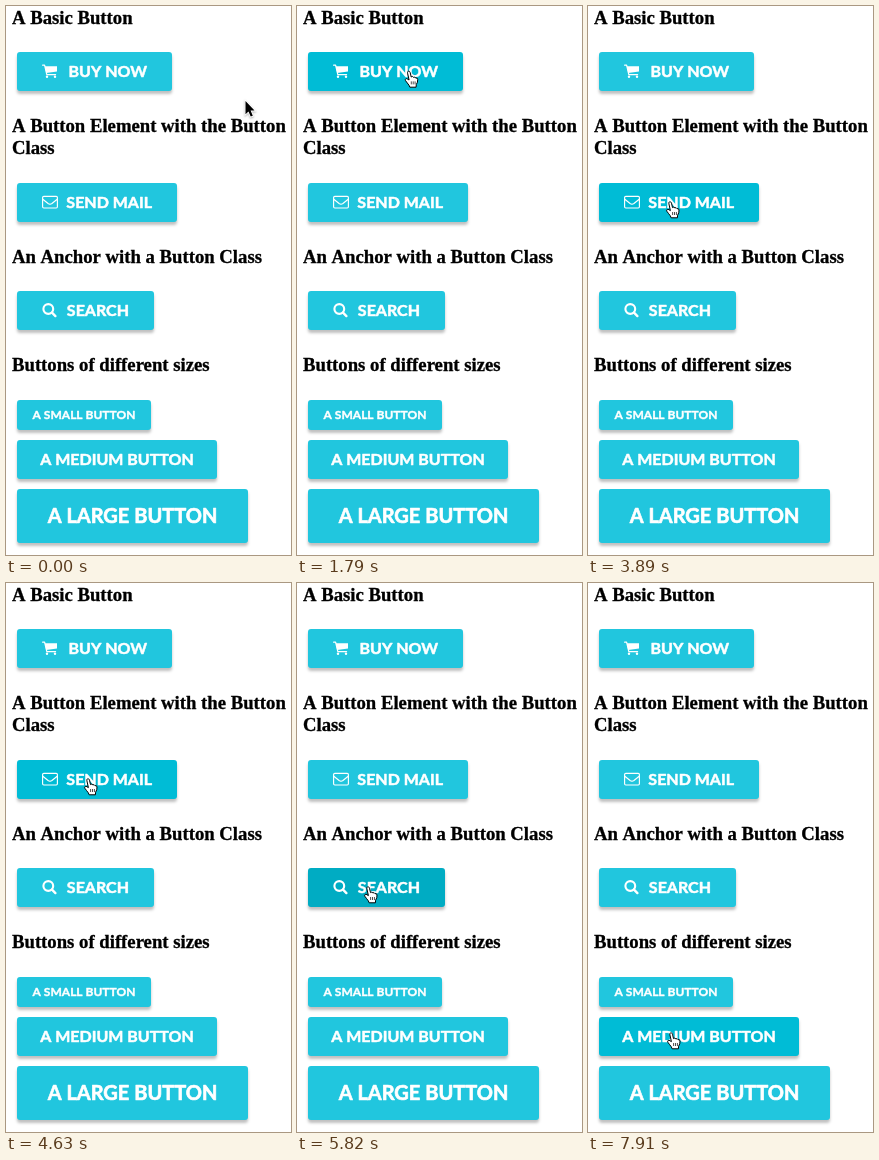
An HTML page with a canvas that plays this animation: 285 px wide and 549 px high, repeating every 8 s.

```html
<!DOCTYPE html>
<html lang="en">
<head>
<meta charset="utf-8">
<title>Button styles</title>
<style>
html, body { margin: 0; width: 285px; height: 549px; overflow: hidden; background: #fff; }
canvas { display: block; }
</style>
</head>
<body>
<canvas id="stage" width="285" height="549"></canvas>
<script>
const ctx = document.getElementById('stage').getContext('2d');
const LOOP = 8000;
const STEP = 145; // the pointer is redrawn at this interval while it travels
const COLORS = { idle: '#21c6de', hover: '#00bcd6', press: '#00acc3' };

const SIZES = {
  small: { h: 30, font: 12, pad: 15 },
  medium: { h: 39, font: 16, pad: 25 },
  large: { h: 54, font: 20, pad: 30 }
};

const headings = [
  { text: 'A Basic Button', y: 18 },
  { text: 'A Button Element with the Button', y: 126 },
  { text: 'Class', y: 148 },
  { text: 'An Anchor with a Button Class', y: 257 },
  { text: 'Buttons of different sizes', y: 365 }
];

function button(label, y, w, size, icon) {
  return { label, x: 11, y, w, icon, ...SIZES[size] };
}

const buy = button('BUY NOW', 46, 155, 'medium', cart);
const mail = button('SEND MAIL', 177, 160, 'medium', envelope);
const search = button('SEARCH', 285, 137, 'medium', magnifier);
const small = button('A SMALL BUTTON', 394, 134, 'small');
const medium = button('A MEDIUM BUTTON', 434, 200, 'medium');
const large = button('A LARGE BUTTON', 483, 231, 'large');
const buttons = [buy, mail, search, small, medium, large];

// Each visit: when travel starts, its steps, where it ends, and the click there.
const home = { x: 240, y: 95 };
const visits = [
  { start: 1200, steps: 6, x: 84, y: 59, press: 2690, release: 3440, lag: 3 },
  { start: 3440, steps: 4, x: 82, y: 196, press: 4340, release: 4630 },
  { start: 4930, steps: 4, x: 71, y: 304, press: 5820, release: 5970 },
  { start: 6420, steps: 3, x: 79, y: 408, press: 7320, release: 7620 },
  { start: 7620, steps: 3, x: 83, y: 450 }
];

function pointerAt(t) {
  const i = visits.findLastIndex(v => v.start <= t);
  if (i < 0) return home;
  const from = visits[i - 1] || home;
  const to = visits[i];
  const step = Math.floor((t - to.start) / STEP) + 1;
  const p = Math.min(1, step / to.steps);
  const eased = 1 - (1 - p ** (to.lag || 1)) ** 2;
  return {
    x: from.x + (to.x - from.x) * eased,
    y: from.y + (to.y - from.y) * eased,
    pressed: t >= to.press && t < to.release
  };
}

function shape(...points) {
  ctx.beginPath();
  points.forEach(([x, y]) => ctx.lineTo(x, y));
}

function line(width, ...points) {
  shape(...points);
  ctx.lineWidth = width;
  ctx.stroke();
}

function disc(x, y, r) {
  ctx.beginPath();
  ctx.arc(x, y, r, 0, Math.PI * 2);
}

// A hairline outline gives the text its heavier weight.
function heavyText(text, x, y, weight) {
  ctx.lineWidth = weight;
  ctx.fillText(text, x, y);
  ctx.strokeText(text, x, y);
}

function cart() {
  line(1.2, [0.6, -5.8], [2.6, -5.8], [4.8, 3.6], [13.6, 3.6]);
  shape([2.8, -4.8], [15, -4.8], [15, 0.6], [4.2, 2]);
  ctx.fill();
  for (const x of [5, 13]) {
    disc(x, 5.7, 1.2);
    ctx.fill();
  }
}

function envelope() {
  ctx.beginPath();
  ctx.roundRect(0.6, -5.6, 14.8, 11.6, 1.2);
  ctx.lineWidth = 1.15;
  ctx.stroke();
  line(1.15, [0.8, -2.8], [6.4, 1.7], [8, 2.3], [9.6, 1.7], [15.2, -2.8]);
}

function magnifier() {
  disc(6.3, -1, 4.9);
  ctx.lineWidth = 2.1;
  ctx.stroke();
  line(2.4, [10, 2.7], [13.4, 6.1]);
}

function drawButton(b, color) {
  ctx.save();
  ctx.shadowColor = 'rgba(0,0,0,0.25)';
  ctx.shadowOffsetY = 3;
  ctx.shadowBlur = 3;
  ctx.fillStyle = color;
  ctx.beginPath();
  ctx.roundRect(b.x, b.y, b.w, b.h, 3);
  ctx.fill();
  ctx.restore();

  ctx.save();
  const middle = b.y + b.h / 2;
  const right = b.x + b.w - b.pad;
  ctx.fillStyle = ctx.strokeStyle = '#fff';
  ctx.lineCap = ctx.lineJoin = 'round';
  ctx.font = `bold ${b.font}px Lato, sans-serif`;
  ctx.textAlign = b.icon ? 'right' : 'center';
  heavyText(b.label, b.icon ? right : b.x + b.w / 2,
    Math.round(middle + b.font * 0.36), b.font * 0.035);
  if (b.icon) {
    ctx.translate(b.x + b.pad, middle - 0.5);
    b.icon();
  }
  ctx.restore();
}

function drawArrow(x, y) {
  ctx.save();
  ctx.translate(x - 0.5, y);
  ctx.shadowColor = 'rgba(0,0,0,0.3)';
  ctx.shadowOffsetY = 1;
  ctx.shadowBlur = 2;
  shape([0, 0], [0, 13.2], [3, 10.4], [5.2, 15.6], [7.3, 14.7], [5.1, 9.6], [9, 9.6]);
  ctx.closePath();
  ctx.strokeStyle = '#fff';
  ctx.lineWidth = 1.8;
  ctx.stroke();
  ctx.shadowColor = 'transparent';
  ctx.fillStyle = '#000';
  ctx.fill();
  ctx.restore();
}

function drawHand(x, y) {
  ctx.save();
  ctx.translate(x - 4, y - 1);
  ctx.beginPath();
  ctx.moveTo(4.4, 9.6);
  ctx.lineTo(2.9, 2.8);
  ctx.bezierCurveTo(2.4, 0.4, 4.9, 0, 5.5, 2.2);
  ctx.lineTo(6.5, 6.6);
  ctx.quadraticCurveTo(8, 5.2, 8.8, 7);
  ctx.quadraticCurveTo(10.2, 5.9, 11, 7.7);
  ctx.quadraticCurveTo(12.8, 7, 13, 9);
  ctx.quadraticCurveTo(13.2, 12, 11.6, 14.2);
  ctx.lineTo(11.4, 16.8);
  ctx.lineTo(5.2, 16.8);
  ctx.quadraticCurveTo(4.6, 14.8, 2.6, 12.6);
  ctx.lineTo(0.8, 10.2);
  ctx.bezierCurveTo(0, 8.6, 1.8, 7.6, 3, 8.8);
  ctx.closePath();
  ctx.fillStyle = '#fff';
  ctx.strokeStyle = '#000';
  ctx.lineJoin = 'round';
  ctx.lineWidth = 1;
  ctx.fill();
  ctx.stroke();
  for (const px of [6.6, 8.5, 10.4]) line(0.7, [px, 11], [px, 14]);
  ctx.restore();
}

function render(t) {
  const { x, y, pressed } = pointerAt(t);
  const target = buttons.find(b =>
    x >= b.x && x < b.x + b.w && y >= b.y && y < b.y + b.h);

  ctx.fillStyle = '#fff';
  ctx.fillRect(0, 0, 285, 549);
  ctx.fillStyle = ctx.strokeStyle = '#000';
  ctx.font = 'bold 18.72px "Liberation Serif", Times, serif';
  headings.forEach(h => heavyText(h.text, 6, h.y, 0.3));

  buttons.forEach(b => {
    const state = b !== target ? 'idle' : pressed ? 'press' : 'hover';
    drawButton(b, COLORS[state]);
  });
  (target ? drawHand : drawArrow)(x, y);
}

const start = performance.now();
function tick() {
  render((performance.now() - start) % LOOP);
  requestAnimationFrame(tick);
}
tick();
</script>
</body>
</html>
```
